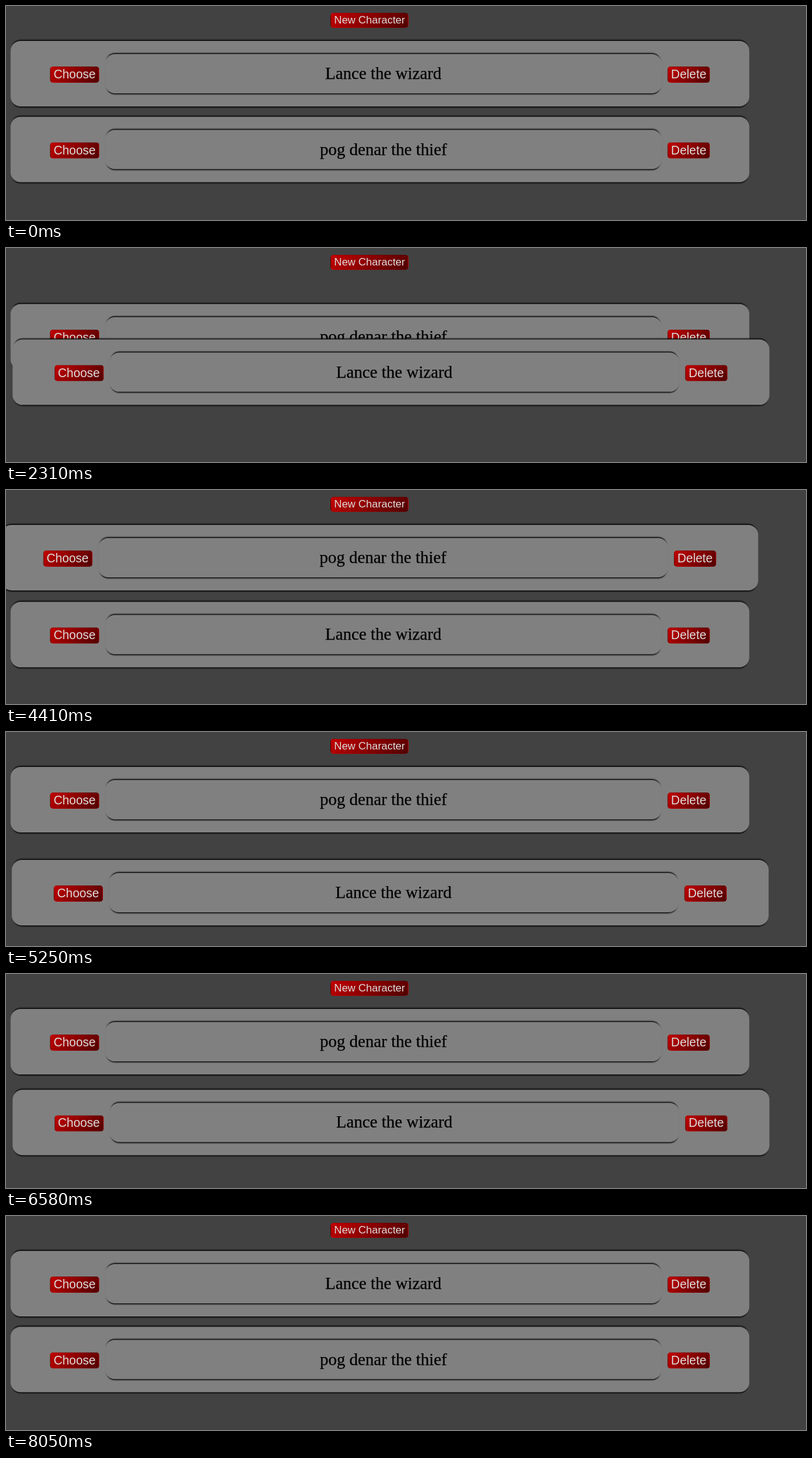
Write an HTML page that moves like this. It is 1280 px wide and 343 px high and loops after 8.75 s.

```html
<!DOCTYPE html>
<html lang="en">
<head>
<meta charset="utf-8">
<title>Character list</title>
<style>
  html, body { margin: 0; width: 100%; height: 100%; overflow: hidden; background: #424242; }
  #stage { position: relative; width: 1280px; height: 343px; overflow: hidden; background: #424242; }
  .btn {
    position: absolute; box-sizing: border-box;
    border: 1.5px solid transparent; border-radius: 5px;
    background: linear-gradient(135deg, #c20000, #500000);
    color: #ddd; font-family: "Liberation Sans", Arial, sans-serif;
    text-align: center; white-space: nowrap;
  }
  #add { left: 519.3px; top: 11.3px; width: 125px; height: 23.4px; font-size: 17px; line-height: 21.6px; }
  .card, .name { border-radius: 16px; box-shadow: 0 3.5px 2px -2px #000, 0 -3.5px 2px -2px #000; }
  .card { position: absolute; left: 0; top: 0; width: 1182px; height: 104.5px; background: #808080; }
  .card .btn { top: 40.6px; height: 26.4px; font-size: 19.5px; line-height: 23.4px; }
  .choose { left: 63px; width: 79px; }
  .delete { right: 63px; width: 68px; }
  .name {
    position: absolute; left: 151px; right: 140px; top: 20.5px; height: 63.5px;
    font: 27px/63.2px "Liberation Serif", "Times New Roman", serif;
    color: #000; text-align: center; white-space: nowrap;
    -webkit-text-stroke: .25px #000;
  }
  .wide { width: 1210.5px; }
  .wide .choose { left: 66.6px; }
  .wide .delete { right: 66.6px; }
  .wide .name { left: 155px; right: 144px; }
</style>
</head>
<body>
<div id="stage"><div class="btn" id="add">New Character</div></div>
<script>
const LOOP = 8750, STEP = 70, LAST_HOVER = 8050;
const REST_X = 7.3, WIDE_X = -7.5, HOVER = 1.025, PULL_X = 18;
const slotY = slot => 56 + slot * 121.5;
const stage = document.getElementById('stage');

function makeCard(name) {
  const card = document.createElement('div');
  card.className = 'card';
  for (const [cls, text] of [['btn choose', 'Choose'], ['name', name], ['btn delete', 'Delete']]) {
    const part = document.createElement('div');
    part.className = cls;
    part.textContent = text;
    card.append(part);
  }
  stage.append(card);
  return card;
}
const cards = [makeCard('Lance the wizard'), makeCard('pog denar the thief')];

// The hand moves a card past its new slot by `over`, eases back and drops it.
// move, swap and drop are ms after start.
const drags = [
  { card: 0, from: 0, to: 1, start: 1960, end: 3010, move: 610, swap: 268, drop: 900, over: 27 },
  { card: 0, from: 1, to: 0, start: 3220, end: 3990, move: 210, swap: 55, drop: 560, over: 0 },
  { card: 1, from: 1, to: 0, start: 4200, end: 4760, move: 180, swap: 57, drop: 110, over: 0 },
  { card: 0, from: 1, to: 1, start: 5040, end: 5320, move: 180, swap: 0, drop: 280, over: 35 },
  { card: 0, from: 1, to: 0, start: 5320, end: 5880, move: 260, swap: 110, drop: 460, over: -53 },
  { card: 0, from: 0, to: 1, start: 6090, end: 6930, move: 330, swap: 145, drop: 580, over: 27 },
  { card: 1, from: 0, to: 1, start: 7210, end: 7770, move: 180, swap: 57, drop: 110, over: 0 }
];

function smooth(u) {
  u = Math.min(1, Math.max(0, u));
  return u * u * (3 - 2 * u);
}

const mix = (a, b, u) => a + (b - a) * u;

function spring(ms) {
  if (ms <= 0) return 0;
  const z = 0.74, w = 25, t = ms / 1000, wd = w * Math.sqrt(1 - z * z);
  return 1 - Math.exp(-z * w * t) * (Math.cos(wd * t) + z * w / wd * Math.sin(wd * t));
}

function place(card, x, y, mode) {
  card.classList.toggle('wide', mode === 'drag');
  card.style.zIndex = mode === 'rest' ? 1 : 2;
  card.style.transform = `translate(${x}px, ${y}px)` + (mode === 'hover' ? ` scale(${HOVER})` : '');
}

function drawDrag(d, t) {
  const ms = t - d.start, active = cards[d.card], other = cards[1 - d.card];
  if (t < d.end) {
    const x = WIDE_X + PULL_X * smooth(ms / 250) * (1 - smooth((ms - d.drop) / 100));
    const y = mix(slotY(d.from), slotY(d.to) + d.over, smooth(ms / d.move));
    const back = ms > d.move ? d.over * smooth((ms - d.move) / (d.drop - d.move)) : 0;
    place(active, x, y - back, 'drag');
  } else {
    place(active, REST_X, slotY(d.to), t < LAST_HOVER ? 'hover' : 'rest');
  }
  place(other, REST_X, mix(slotY(1 - d.from), slotY(1 - d.to), spring(ms - d.swap)), 'rest');
}

function draw(t) {
  const drag = drags.filter(d => t >= d.start).pop();
  if (drag) return drawDrag(drag, t);
  const hovered = t < 1540 ? -1 : t < 1610 ? 1 : 0;
  cards.forEach((c, i) => place(c, REST_X, slotY(i), i === hovered ? 'hover' : 'rest'));
}

const start = performance.now();
function tick() {
  const t = (performance.now() - start) % LOOP;
  draw(Math.floor(t / STEP) * STEP);
  requestAnimationFrame(tick);
}
tick();
</script>
</body>
</html>
```
